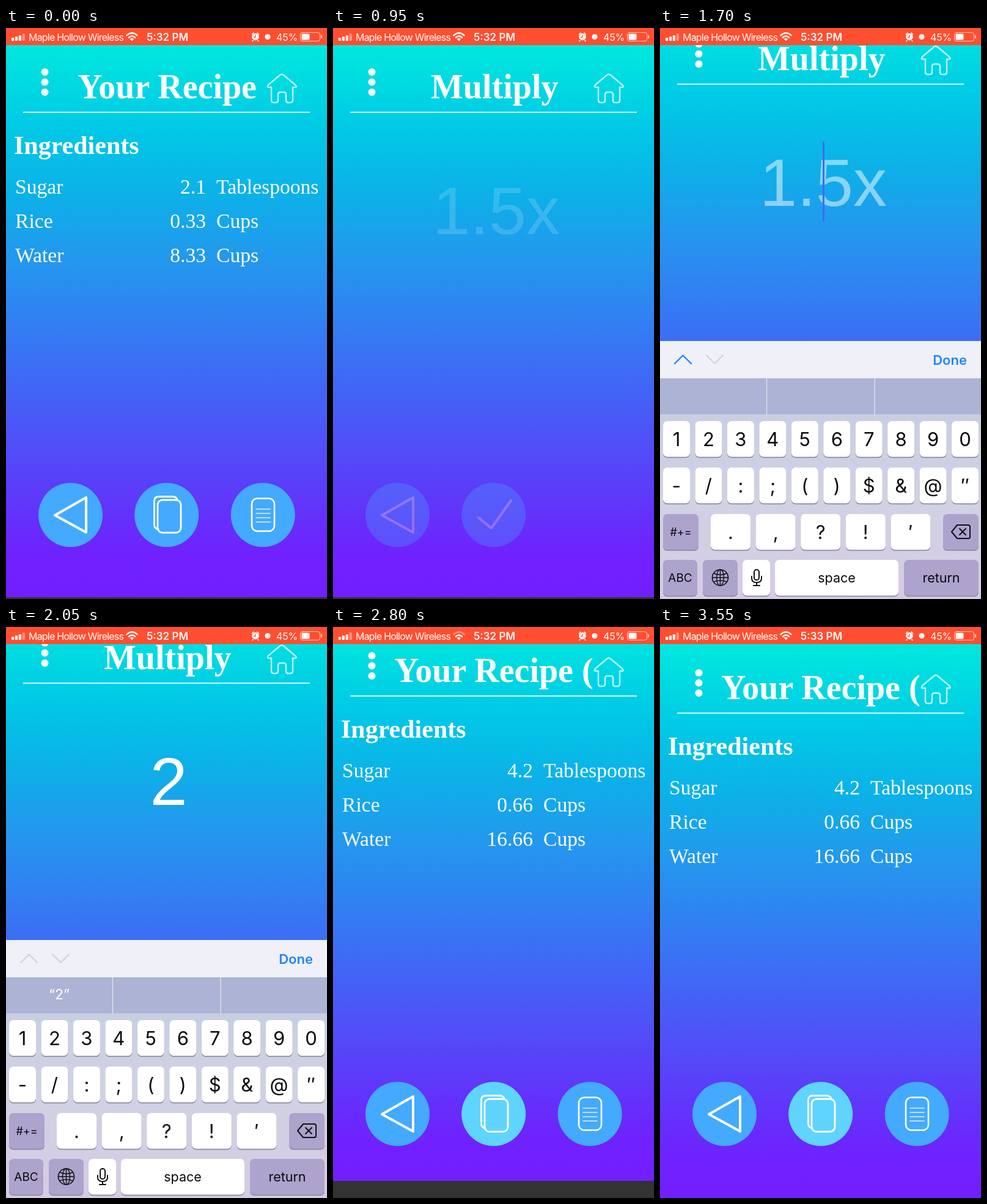
An HTML page for the animation above (3600 ms loop, 525x934 px).

```html
<!DOCTYPE html>
<html lang="en">
<head>
<meta charset="utf-8">
<title>Recipe app</title>
<style>
  html, body { margin: 0; width: 100%; height: 100%; overflow: hidden; background: #333; }
  svg { display: block; width: 525px; height: 934px; }
  .serif { font-family: "Liberation Serif", "Times New Roman", serif; fill: #fff; }
  .sans { font-family: "Liberation Sans", Arial, sans-serif; fill: #fff; }
  .ui { font-family: Inter, Roboto, sans-serif; }
  .title { font-size: 56px; font-weight: bold; }
  .head { font-size: 42px; font-weight: bold; }
  .row { font-size: 33.6px; }
  .mid { text-anchor: middle; }
  .end { text-anchor: end; }
  .line { fill: none; stroke: #fff; stroke-linecap: round; stroke-linejoin: round; }
  .dark { fill: none; stroke: #111; stroke-width: 2; stroke-linecap: round; stroke-linejoin: round; }
</style>
</head>
<body>
<svg id="stage" viewBox="0 0 525 934" xmlns="http://www.w3.org/2000/svg"></svg>
<script>
const LOOP = 3600, STEP = 50;

const text = (x, y, s, cls, more = '') => `<text x="${x}" y="${y}" class="${cls}" ${more}>${s}</text>`;
const path = (d, cls, more = '') => `<path d="${d}" class="${cls}" ${more}/>`;
const rect = (x, y, w, h, more = '') => `<rect x="${x}" y="${y}" width="${w}" height="${h}" ${more}/>`;
const group = (id, inner) => `<g id="${id}">${inner}</g>`;

// Round buttons
const disc = (x, color = '#44aaff') => `<circle cx="${x}" cy="796.5" r="52.5" fill="${color}"/>`;
const back = disc(105.5) + path('M80 797L131 768V825Z', 'line', 'stroke-width="4"');
const check = disc(262.7) + path('M238 801L259 818L291 773', 'line', 'stroke-width="4"');
const copy = color => disc(262.7, color) +
  path('M249 820Q242.5 819 242.5 812V774Q242.5 766.5 250 766.5H272Q279 766.5 280 772', 'line', 'stroke-width="2.8"') +
  rect(248, 772, 38, 53.5, 'rx="8" class="line" stroke-width="2.8"');
const note = disc(420.2) + rect(402, 769.5, 37, 53.5, 'rx="9" class="line" stroke-width="2.6"') +
  path('M409 787H432M409 794H432M409 801H432M409 808H432', 'line', 'stroke-width="1.5" opacity=".85"');

// Screens
const recipe = amounts => {
  const items = [['Sugar', 'Tablespoons'], ['Rice', 'Cups'], ['Water', 'Cups']];
  return text(13, 206, 'Ingredients', 'serif head') + items.map(([name, unit], i) => {
    const y = 271 + i * 56;
    return text(15, y, name, 'serif row') + text(327, y, amounts[i], 'serif row end') + text(344, y, unit, 'serif row');
  }).join('');
};
const choice = (y, label) => `<circle cx="263" cy="${y}" r="103.7" class="line" stroke-width="3"/>` +
  text(262.5, y + 10.5, label, 'sans mid', 'font-size="28"');
const factor = text(267, 337, '1.5x', 'sans mid', 'id="hint" font-size="110" opacity=".5"') +
  text(266, 336.5, '2', 'sans mid', 'id="typed" font-size="110"') +
  rect(0, 232, 3, 130, 'id="caret" fill="#3f6cf0"');

const scenes = [
  { body: recipe(['2.1', '0.33', '8.33']), foot: back + copy() + note, fade: [[0, 1], [250, 0]] },
  { body: choice(289.5, 'Convert') + choice(544.5, 'Multiply'), foot: back,
    fade: [[200, 0], [500, 1], [700, 1], [880, 0]] },
  { body: factor, foot: back + check, fade: [[880, 0], [1100, 1], [2250, 1], [2400, 0]] },
  { body: recipe(['4.2', '0.66', '16.66']), foot: back + copy('#5fd4ff') + note, fade: [[2350, 0], [2500, 1]] }
];

const titles = [
  [0, 'Your Recipe', 117],
  [250, 'Manipulate', 125],
  [900, 'Multiply', 160],
  [2400, 'Your Recipe (2x)', 100]
];

const header =
  [72, 88.5, 105].map(y => `<circle cx="63.5" cy="${y}" r="6" fill="#fff"/>`).join('') +
  `<g clip-path="url(#titleClip)">${text(0, 115, '', 'serif title', 'id="title"')}</g>` +
  rect(28, 137, 469, 1.6, 'fill="#fff"') +
  path('M434 97H430Q426 97 429 93L448 77Q451 74.500 454 77L473 93Q477 97 472 97H469V118Q469 122 465 122H461Q458 122 458 118V109Q458 105 454 105H449Q445 105 445 109V118Q445 122 441 122H438Q434 122 434 118Z',
    'line', 'stroke-width="2.4" opacity=".75"');

// Keyboard
const key = (x, y, w, label, size, soft) =>
  rect(x, y + 1.8, w, 58.5, 'rx="7" fill="#8d8b9d"') +
  rect(x, y, w, 58.5, `rx="7" fill="${soft ? '#ada3cd' : '#fff'}"`) +
  text(x + w / 2, y + 29.5 + size * .36, label, 'ui mid', `font-size="${size}" fill="#0a0a0a"`);
const row = (chars, x, y, pitch, w) => [...chars].map((c, i) => key(x + i * pitch, y, w, c, 31)).join('');
const keys =
  row('1234567890', 5, 643, 52.45, 44) +
  row('-/:;()$&@″', 5, 719, 52.45, 44).replace('>&<', '>&amp;<') +
  row('.,?!′', 83, 795, 73.6, 65) +
  key(5, 795, 58, '#+=', 18, true) + key(463, 795, 58, '', 20, true) +
  key(5, 870, 56, 'ABC', 19, true) + key(70, 870, 57, '', 20, true) + key(135, 870, 45, '', 20) +
  key(188, 870, 202, 'space', 21.5) + key(399, 870, 122, 'return', 21.5, true) +
  path('M477 824L486 813H504Q507 813 507 816V832Q507 835 504 835H486ZM490 819L500 829M500 819L490 829', 'dark') +
  path('M85.500 899H111.500M98.500 886V912M88 892Q98.500 897 109 892M88 906Q98.500 901 109 906', 'dark', 'style="stroke-width:1.4"') +
  '<circle cx="98.5" cy="899" r="13" class="dark" style="stroke-width:1.6"/>' +
  '<ellipse cx="98.5" cy="899" rx="6" ry="13" class="dark" style="stroke-width:1.4"/>' +
  rect(154, 886, 8, 17, 'rx="4" class="dark"') +
  path('M150 897V900Q150 907 158 907Q166 907 166 900V897M158 907V912M153 912H163', 'dark');
const panel =
  rect(0, 512, 525, 424, 'fill="url(#board)"') +
  rect(0, 512, 525, 61, 'fill="#eff0f8"') +
  rect(0, 573, 525, 59, 'fill="#acb3d4"') +
  path('M174.500 573V632M351 573V632', 'line', 'stroke-width="1.2" opacity=".7"') +
  path('M24 549L37.500 535.500L51 549', 'line', 'id="prev" stroke-width="2.4"') +
  path('M76 535.500L89.500 549L103 535.500', 'line', 'style="stroke:#d3d5dc" stroke-width="2.4"') +
  text(502, 550.5, 'Done', 'ui end', 'font-size="22" font-weight="600" fill="#1f86f5"') +
  text(87, 609, '“2”', 'ui mid', 'id="guess" font-size="23" fill="#fff"') + keys;

// Status bar
const status =
  rect(0, 0, 525, 28, 'fill="#ff4e30"') +
  [5, 7, 9, 12].map((h, i) => rect(9 + i * 5.9, 21 - h, 4.2, h, `rx="1" fill="#fff" opacity="${i < 3 ? 1 : .4}"`)).join('') +
  text(37, 20.5, 'Maple Hollow Wireless', 'ui', 'font-size="16" letter-spacing="-.8" fill="#fff"') +
  path('M197.500 12Q206 4.500 214.500 12', 'line', 'id="wave" stroke-width="2.6"') +
  path('M201 15.500Q206 11 211 15.500', 'line', 'stroke-width="2.6"') +
  path('M203.500 18L206 21L208.500 18Q206 16 203.500 18Z', 'line', 'style="fill:#fff" stroke-width="1"') +
  text(264, 20.5, '', 'ui mid', 'id="clock" font-size="17" font-weight="600" fill="#fff"') +
  '<circle cx="408" cy="14.500" r="5.800" fill="#fff"/>' +
  path('M402.500 10.500L405 8M413.500 10.500L411 8M404 20.500L403 21.500M412 20.500L413 21.500', 'line', 'stroke-width="1.6"') +
  path('M408 11.500V15H405.500', 'line', 'style="stroke:#ff4e30" stroke-width="1.3"') +
  '<circle cx="428" cy="14.500" r="4.500" fill="#fff"/>' +
  text(442, 20.5, '45%', 'ui', 'font-size="16" letter-spacing="-.2" fill="#fff"') +
  rect(481.5, 7.5, 32, 14, 'rx="3.500" class="line" stroke-width="1" opacity=".7"') +
  rect(483.5, 9.5, 13, 10, 'rx="1.500" fill="#fff"') +
  path('M516 12.500V16.500', 'line', 'stroke-width="1.800" opacity=".7"');

const stops = [[0, '#00e8de'], [.14, '#00cbe6'], [.27, '#0cb1e8'], [.39, '#2497ee'], [.5, '#3180f2'],
  [.63, '#4363f6'], [.75, '#5449f8'], [.86, '#652ffb'], [.93, '#7021ff'], [1, '#721eff']];

const stage = document.getElementById('stage');
stage.innerHTML =
  `<defs>
    <linearGradient id="sky" gradientUnits="userSpaceOnUse" x1="0" y1="28" x2="0" y2="931">
      ${stops.map(([o, c]) => `<stop offset="${o}" stop-color="${c}"/>`).join('')}
    </linearGradient>
    <linearGradient id="board" x1="0" y1="0" x2="0" y2="1">
      <stop offset=".28" stop-color="#c8cee2"/><stop offset=".6" stop-color="#d0d2e3"/>
      <stop offset="1" stop-color="#d6cbe4"/>
    </linearGradient>
    <clipPath id="titleClip"><rect x="0" y="28" width="427" height="120"/></clipPath>
  </defs>` +
  rect(0, 0, 525, 934, 'fill="#333"') +
  group('page', rect(0, -72, 525, 1003, 'fill="url(#sky)"') + header +
    scenes.map((s, i) => group('body' + i, s.body)).join('')) +
  group('feet', scenes.map((s, i) => group('foot' + i, s.foot)).join('')) +
  group('panel', panel) + status;

const el = {};
stage.querySelectorAll('[id]').forEach(n => el[n.id] = n);
const set = (id, name, value) => el[id].setAttribute(name, value);
const show = (id, on) => set(id, 'visibility', on ? 'visible' : 'hidden');
const shift = (id, y) => set(id, 'transform', `translate(0 ${y})`);

// Linear interpolation through [time, value] pairs
function at(pairs, t) {
  const i = pairs.findIndex(p => p[0] > t);
  if (i === 0) return pairs[0][1];
  if (i < 0) return pairs[pairs.length - 1][1];
  const [t0, a] = pairs[i - 1], [t1, b] = pairs[i];
  return a + (b - a) * (t - t0) / (t1 - t0);
}

const panelY = [[1400, 422], [1450, 356], [1500, 190], [1550, 70], [1600, 18], [1650, 0],
  [2050, 0], [2100, 110], [2150, 280], [2200, 390], [2250, 424]];
const lift = [[1400, 0], [1450, -2], [1500, -16], [1550, -33], [1600, -42], [1650, -46],
  [2050, -46], [2100, -34], [2150, -16], [2200, -4], [2250, 0]];
const bounce = [[2500, 0], [2550, -6], [2650, -20], [2750, -27], [2800, -25], [2900, -14],
  [3000, 0], [3050, 3], [3100, 5], [3300, 14], [3450, 8], [3550, 3]];

function draw(t) {
  const up = at(lift, t), typed = t >= 1800;
  shift('page', up + at(bounce, t));
  shift('feet', up);
  shift('panel', at(panelY, t));
  show('panel', t >= 1450 && t < 2250);

  scenes.forEach((s, i) => {
    const a = at(s.fade, t);
    for (const id of ['body' + i, 'foot' + i]) {
      set(id, 'opacity', a);
      set(id, 'display', a > 0 ? 'inline' : 'none');
    }
  });

  const [, label, x] = titles.filter(v => v[0] <= t).pop();
  el.title.textContent = label;
  set('title', 'x', x);

  show('hint', !typed);
  show('typed', typed);
  show('caret', t >= 1450 && t < 2000);
  set('caret', 'x', typed ? 298 : 266);
  show('guess', t >= 1850);
  el.prev.style.stroke = t < 2000 ? '#2186f5' : '#d3d5dc';
  set('wave', 'opacity', t >= 2600 && t < 3000 ? .4 : 1);
  el.clock.textContent = t < 3300 ? '5:32 PM' : '5:33 PM';
}

const start = performance.now();
function tick() {
  const t = (performance.now() - start) % LOOP;
  draw(Math.floor(t / STEP) * STEP);
  requestAnimationFrame(tick);
}
tick();
</script>
</body>
</html>
```
